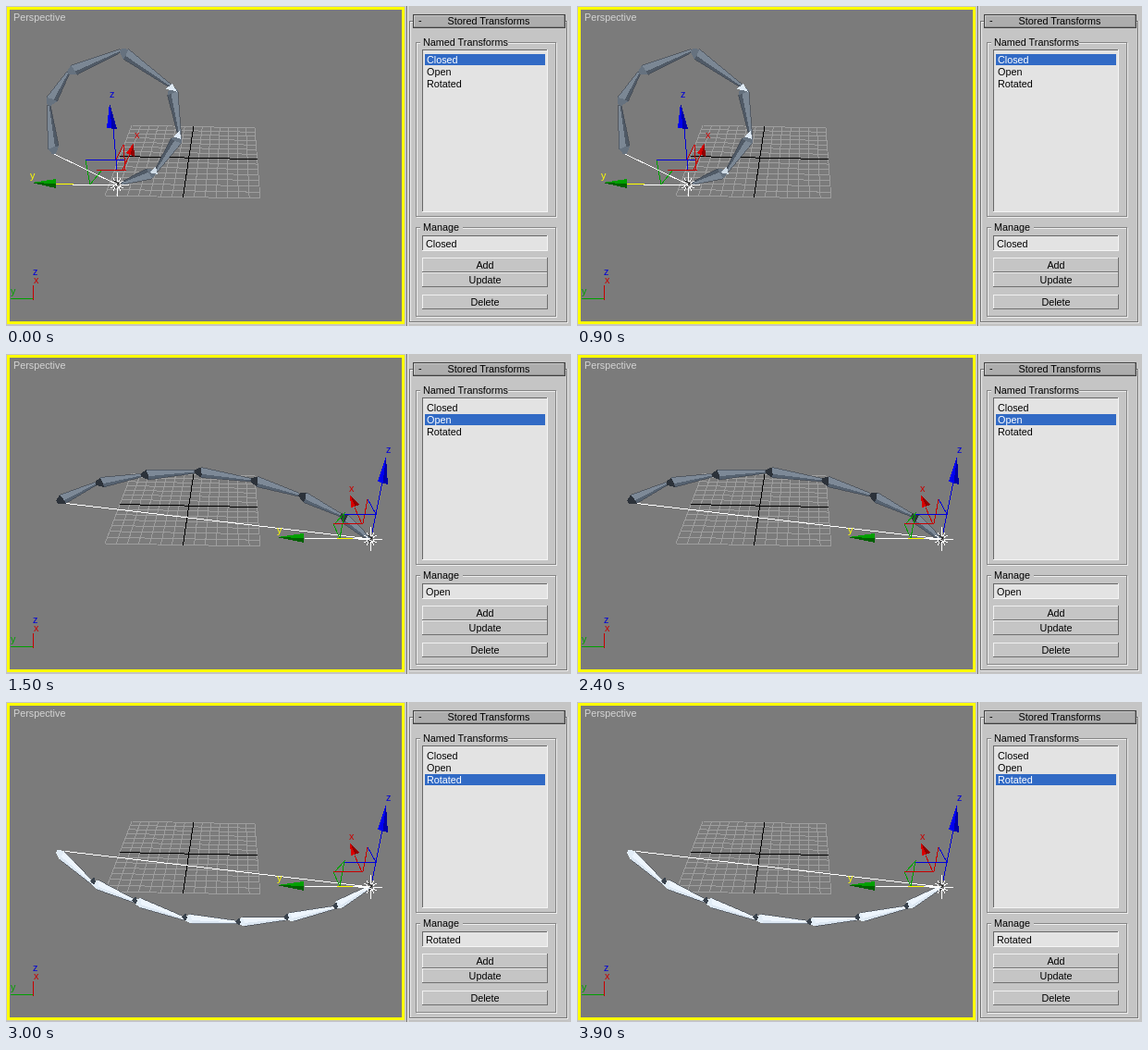
An HTML page for the animation above (4.5 s loop, 611 by 346 pixels).

```html
<!DOCTYPE html>
<html lang="en">
<meta charset="utf-8">
<title>Stored Transforms</title>
<style>
  html, body { margin: 0; width: 100%; height: 100%; overflow: hidden; background: #c5c5c5; }
  svg { display: block; font: 10.8px "Liberation Sans", Arial, sans-serif; shape-rendering: crispEdges; }
</style>
<svg id="stage" width="611" height="346" viewBox="0 0 611 346"></svg>
<script>
const STEP = 1500;
const NAMES = ['Closed', 'Open', 'Rotated'];
const RED = '#c80000', GREEN = '#00a000', BLUE = '#0000d8', YELLOW = '#ffff00';

const rect = (x, y, w, h, fill) => `<rect x="${x}" y="${y}" width="${w}" height="${h}" fill="${fill}"/>`;
const line = (points, stroke, width = 1) =>
  `<polyline points="${points}" fill="none" stroke="${stroke}" stroke-width="${width}"/>`;
const poly = (points, fill) => `<polygon points="${points}" fill="${fill}"/>`;
const text = (x, y, s, fill = '#000', anchor = 'start') =>
  `<text x="${x}" y="${y}" fill="${fill}" text-anchor="${anchor}">${s}</text>`;

// Box with a one pixel bevel; swap the edge colours to sink it.
const bevel = (x, y, w, h, fill, topLeft, bottomRight) =>
  rect(x, y, w, h, bottomRight) + rect(x, y, w - 1, h - 1, topLeft) + rect(x + 1, y + 1, w - 2, h - 2, fill);
const sunken = (x, y, w, h) => bevel(x, y, w, h, '#e3e3e3', '#686868', '#f4f4f4');
const button = (y, label) =>
  bevel(450, y, 136, 16, '#c5c5c5', '#f0f0f0', '#707070') + text(518, y + 12, label, '#000', 'middle');

function groupBox(y, h, label, labelWidth) {
  const frame = (d, colour) =>
    `<rect x="${443.5 + d}" y="${y + .5 + d}" width="151" height="${h}" fill="none" stroke="${colour}"/>`;
  return frame(1, '#eee') + frame(0, '#858585') + rect(448, y - 1, labelWidth, 4, '#c5c5c5') + text(451, y + 4, label);
}

// Perspective map of the unit square onto the floor quad.
function floorPoint(u, v) {
  const [x0, y0, x1, y1, x2, y2, x3, y3] = [136, 129, 269, 132, 275, 208, 107, 205];
  const dx1 = x1 - x2, dx2 = x3 - x2, sx = x0 - x1 + x2 - x3;
  const dy1 = y1 - y2, dy2 = y3 - y2, sy = y0 - y1 + y2 - y3;
  const det = dx1 * dy2 - dx2 * dy1;
  const g = (sx * dy2 - dx2 * sy) / det, h = (dx1 * sy - sx * dy1) / det;
  const w = g * u + h * v + 1;
  return [((x1 - x0 + g * x1) * u + (x3 - x0 + h * x3) * v + x0) / w,
          ((y1 - y0 + g * y1) * u + (y3 - y0 + h * y3) * v + y0) / w];
}

function floorGrid() {
  const pair = (t, colour) => line([floorPoint(t, 0), floorPoint(t, 1)], colour) +
    line([floorPoint(0, t), floorPoint(1, t)], colour);
  let out = '';
  for (let i = 0; i <= 14; i++) out += pair(i / 14, '#9e9e9e');
  return out + pair(.5, '#000');
}

// Each bone swells just after its joint and tapers to the next one.
function bone([ax, ay], [bx, by], [light, dark, cap], half) {
  const dx = bx - ax, dy = by - ay, len = Math.hypot(dx, dy);
  const at = (along, side) => [ax + (dx * along - dy * side) / len, ay + (dy * along + dx * side) / len];
  const left = at(6, -half), right = at(8, half), mid = at(8, half * .3);
  return poly([at(0, -1), left, at(len, -1.5), at(len, .5), mid], light) +
    poly([at(0, 1), right, at(len, 2), at(len, .5), mid], dark) +
    poly([at(0, -2), left, mid, right, at(0, 2)], cap) +
    line([left, at(len, -1.5), at(len, 2), right], '#39404a', .6);
}
const chain = (joints, colours, half) =>
  joints.slice(1).map((joint, i) => bone(joints[i], joint, colours, half)).join('');

function goal(x, y) {
  let out = '';
  for (let i = 0; i < 12; i++) {
    const a = i * Math.PI / 6, r = i % 3 ? 8 : 13;
    const ray = d => [x + Math.cos(a) * d, y + Math.sin(a) * d];
    out += line([ray(3), ray(r)], '#fff');
  }
  return out + line([[x - 3, y - 4], [x + 2, y - 1], [x - 2, y + 4]], '#222') + line([[x - 4, y], [x + 4, y + 3]], '#fff');
}

// Solid arrow head with a shaded side.
const cone = (tip, a, b, light, dark) => {
  const mid = [(a[0] + b[0]) / 2, (a[1] + b[1]) / 2];
  return poly([tip, a, b], light) + poly([tip, mid, b], dark);
};

const closedGizmo =
  line('72,193 120,193', '#fff') + line('53,192 73,192', YELLOW) +
  cone([28, 191], [54, 187], [54, 197], GREEN, '#006000') + text(26, 187, 'y', YELLOW) +
  line('120,178 116,132', BLUE) + cone([112, 105], [109, 132], [120, 133], '#0000f0', '#0000a8') + text(112, 99, 'z', BLUE) +
  line('126,177 134,160', RED) + cone([138, 148], [130, 159], [139, 163], '#d80000', '#900000') + text(139, 143, 'x', RED) +
  line('86,167 91,193 104,177', GREEN) + line('86,166 128,166', BLUE) +
  line('98,177 130,177', RED) + line('119,166 127,150 129,177', RED);

const openGizmo =
  line('322,199 394,200', '#fff') + line('358,199 375,199', YELLOW) +
  cone([293, 198], [322, 194], [322, 204], GREEN, '#006000') + text(293, 194, 'y', YELLOW) +
  line('396,193 407,138', BLUE) + cone([411, 111], [402, 138], [413, 141], '#0000f0', '#0000a8') + text(411, 107, 'z', BLUE) +
  line('377,166 385,184', RED) + cone([372, 152], [373, 166], [382, 163], '#d80000', '#900000') + text(371, 149, 'x', RED) +
  line('354,184 361,199 366,172 355,184', GREEN) + line('354,183.5 386,183.5 391,157', RED) +
  line('366,173 400,173 391,157', BLUE);

const backdrop =
  rect(1, 1, 430, 343, YELLOW) + rect(4, 4, 424, 337, '#7b7b7b') + text(8, 16, 'Perspective', '#d4d4d4') +
  line('5,316.5 29,316.5', GREEN) + line('29.5,302 29.5,318', RED) +
  text(5, 312, 'y', GREEN) + text(29, 291, 'z', BLUE) + text(30, 300, 'x', RED) + floorGrid();

const panel =
  rect(433, 0, 1, 346, '#747474') + rect(434, 0, 1, 346, '#eee') +
  bevel(436, 16, 172, 327, '#eee', '#777', '#eee') + bevel(437, 17, 170, 325, '#c5c5c5', '#eee', '#777') +
  rect(440, 9, 165, 15, '#404040') + bevel(441, 10, 163, 13, '#adadad', '#c8c8c8', '#8c8c8c') +
  text(446, 19, '-') + text(522, 20, 'Stored Transforms', '#000', 'middle') +
  groupBox(39, 188, 'Named Transforms', 95) + groupBox(239, 96, 'Manage', 46) +
  sunken(450, 47, 136, 176) + sunken(450, 248, 136, 17) +
  button(272, 'Add') + button(288, 'Update') + button(312, 'Delete');

const openGoal = goal(394, 200);
const poses = [
  closedGizmo + line('52,160 120,193', '#fff') +
    chain([[52, 160], [46, 107], [67, 72], [124, 48], [179, 87], [188, 140], [162, 179], [125, 192]],
      ['#7b8794', '#505a66', '#66727f'], 6) +
    poly('172,90 180,84 185,93 179,91', '#dfeaf5') + poly('181,141 188,134 189,144', '#dfeaf5') +
    poly('155,180 162,174 164,182', '#cfdbe6') + goal(120, 193),
  line('60,161 394,200', '#fff') +
    chain([[55, 160], [97, 140], [146, 131], [204, 127], [265, 136], [317, 152], [362, 174], [393, 200]],
      ['#7d8997', '#566270', '#2c323a'], 5.5) + openGizmo + openGoal,
  line('60,161 394,200', '#fff') +
    chain([[55, 161], [93, 195], [139, 215], [193, 234], [250, 238], [302, 234], [355, 222], [393, 200]],
      ['#edf5fd', '#dce7f2', '#e2edf7'], 5) +
    [[95, 194], [140, 215], [194, 233], [252, 238], [304, 233], [357, 221]]
      .map(([x, y]) => poly([[x - 4, y], [x, y - 5], [x + 2, y], [x, y + 4]], '#39424c')).join('') +
    openGizmo + openGoal,
];

const scenes = poses.map((pose, chosen) => backdrop + pose + panel +
  rect(453, 52 + 13 * chosen, 130, 12, '#316ac5') +
  NAMES.map((name, i) => text(455, 62 + 13 * i, name, i === chosen ? '#fff' : '#000')).join('') +
  text(454, 261, NAMES[chosen]));

const stage = document.getElementById('stage');
stage.innerHTML = scenes.map(scene => `<g>${scene}</g>`).join('');
const start = performance.now();
function draw() {
  const current = Math.floor((performance.now() - start) / STEP) % scenes.length;
  [...stage.children].forEach((group, i) => { group.style.display = i === current ? '' : 'none'; });
  requestAnimationFrame(draw);
}
draw();
</script>
</html>
```
